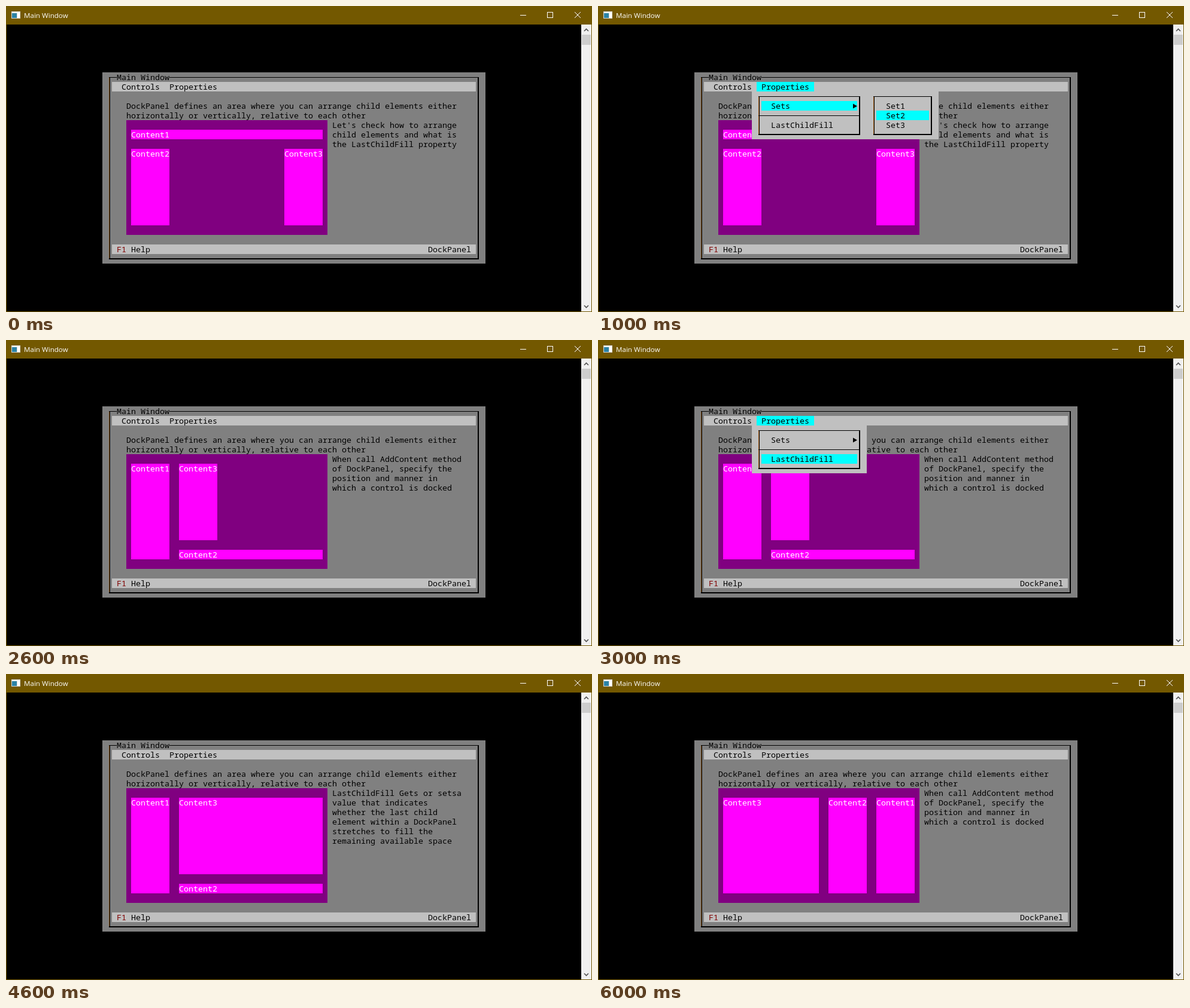
Recreate the animation shown at these times as an HTML page with a canvas. Size 979 by 512 pixels, loop 7000 ms.

```html
<!DOCTYPE html>
<html lang="en">
<head>
<meta charset="utf-8">
<title>Main Window</title>
<style>
html, body { margin: 0; width: 100%; height: 100%; overflow: hidden; background: #000; }
canvas { display: block; }
</style>
</head>
<body>
<canvas id="stage" width="979" height="512"></canvas>
<script>
const ctx = document.getElementById('stage').getContext('2d');

// The console is a grid of 8 x 16 cells starting just inside the window border.
const CELL_W = 8, CELL_H = 16, LEFT = 1, TOP = 31;
const GREY = '#808080', SILVER = '#c0c0c0', CYAN = '#00ffff', MAGENTA = '#ff00ff';
const STEP = 1000;

const INTRO = [
  'DockPanel defines an area where you can arrange child elements either',
  'horizontally or vertically, relative to each other'
];
const CHECK_NOTE = [
  "Let's check how to arrange",
  'child elements and what is',
  'the LastChildFill property'
];
const DOCK_NOTE = [
  'When call AddContent method',
  'of DockPanel, specify the',
  'position and manner in',
  'which a control is docked'
];
const FILL_NOTE = [
  'LastChildFill Gets or setsa',
  'value that indicates',
  'whether the last child',
  'element within a DockPanel',
  'stretches to fill the',
  'remaining available space'
];

// Each entry places Content1, Content2, Content3 as [column, row, width, height].
const set1 = { note: CHECK_NOTE, boxes: [[26, 11, 40, 1], [26, 13, 8, 8], [58, 13, 8, 8]] };
const set2 = { note: DOCK_NOTE, boxes: [[26, 11, 8, 10], [36, 20, 30, 1], [36, 11, 8, 8]] };
const set2Filled = { note: FILL_NOTE, boxes: [[26, 11, 8, 10], [36, 20, 30, 1], [36, 11, 30, 8]] };
const set3 = { note: DOCK_NOTE, boxes: [[58, 11, 8, 10], [48, 11, 8, 10], [26, 11, 20, 10]] };

const scenes = [
  { panel: set1 },
  { panel: set1, menu: { set: 2 } },
  { panel: set2 },
  { panel: set2, menu: {} },
  { panel: set2Filled },
  { panel: set2Filled, menu: { set: 3, checked: true } },
  { panel: set3 }
];

function rect(x, y, w, h, color) {
  ctx.fillStyle = color;
  ctx.fillRect(x, y, w, h);
}

function cells(col, row, w, h, color) {
  rect(LEFT + col * CELL_W, TOP + row * CELL_H, w * CELL_W, h * CELL_H, color);
}

function put(col, row, text, color = '#000') {
  ctx.font = '13.333px "Noto Sans Mono", "DejaVu Sans Mono", monospace';
  ctx.fillStyle = color;
  [...text].forEach((char, i) =>
    ctx.fillText(char, LEFT + (col + i) * CELL_W, TOP + row * CELL_H + 13));
}

function putLines(col, row, lines) {
  lines.forEach((line, i) => put(col, row + i, line));
}

function stroke(color, ...points) {
  ctx.strokeStyle = color;
  ctx.beginPath();
  points.forEach(([x, y]) => ctx.lineTo(x, y));
  ctx.stroke();
}

// Thin top and left edges, heavy right and bottom ones, through cell centres.
function frame(col, row, lastCol, lastRow, fringe) {
  const x = LEFT + col * CELL_W + 4, y = TOP + row * CELL_H + 8;
  const right = LEFT + lastCol * CELL_W + 4, bottom = TOP + lastRow * CELL_H + 8;
  rect(x - 1, y, right - x + 2, 1, '#000');
  rect(x - 1, y + 1, 1, bottom - y, fringe);
  rect(x, y, 1, bottom - y, '#000');
  rect(right - 1, y, 2, bottom - y + 1, '#000');
  rect(x - 1, bottom - 1, right - x + 2, 2, '#000');
}

function drawIcon() {
  rect(9, 9, 15, 12, '#d9d9d9');
  rect(10, 10, 13, 2, '#f4f4f4');
  rect(10, 12, 8, 8, '#2c83a6');
  rect(19, 12, 4, 8, '#ffffff');
}

function drawWindow() {
  rect(0, 0, 979, 512, '#735800');
  rect(1, 31, 977, 480, '#000');
  drawIcon();
  ctx.font = '11.6px "Open Sans", "Noto Sans", sans-serif';
  ctx.fillStyle = '#fff';
  ctx.fillText('Main Window', 30, 20);

  ctx.lineWidth = 1;
  rect(859, 15, 10, 1, '#fff');
  ctx.strokeStyle = '#fff';
  ctx.strokeRect(904.5, 10.5, 9, 9);
  stroke('#fff', [950, 10], [960, 20]);
  stroke('#fff', [960, 10], [950, 20]);

  rect(961, 31, 17, 480, '#f0f0f0');
  rect(962, 48, 15, 17, '#cdcdcd');
  ctx.lineWidth = 1.6;
  stroke('#505050', [966, 42], [969.5, 38.5], [973, 42]);
  stroke('#505050', [966, 501], [969.5, 504.5], [973, 501]);
}

function drawPanel({ note, boxes }) {
  cells(20, 5, 80, 20, GREY);
  frame(21, 5, 98, 24, '#784810');
  cells(23, 5, 11, 1, GREY);
  put(23, 5, 'Main Window');
  cells(22, 6, 76, 1, SILVER);
  put(24, 6, 'Controls');
  put(34, 6, 'Properties');
  cells(22, 23, 76, 1, SILVER);
  put(23, 23, 'F1', '#800000');
  put(26, 23, 'Help');
  put(88, 23, 'DockPanel');

  putLines(25, 8, INTRO);
  putLines(68, 10, note);
  cells(25, 10, 42, 12, '#800080');
  boxes.forEach(([col, row, w, h], i) => {
    cells(col, row, w, h, MAGENTA);
    put(col, row, 'Content' + (i + 1), '#fff');
  });
}

function drawMenu({ set, checked }) {
  const fringe = '#a86420';
  cells(33, 6, 12, 1, CYAN);
  put(34, 6, 'Properties');
  cells(32, 7, set ? 39 : 24, 5, SILVER);
  frame(33, 7, 54, 11, fringe);
  rect(268, 183, 170, 1, '#000');
  cells(34, set ? 8 : 10, 20, 1, CYAN);
  put(36, 8, 'Sets');
  put(36, 10, 'LastChildFill');
  if (checked) put(34, 10, '√');

  ctx.fillStyle = '#000';
  ctx.beginPath();
  ctx.moveTo(426, 163.5);
  ctx.lineTo(433, 167.5);
  ctx.lineTo(426, 171.5);
  ctx.fill();

  if (!set) return;
  frame(57, 7, 69, 11, fringe);
  cells(58, 7 + set, 11, 1, CYAN);
  putLines(60, 8, ['Set1', 'Set2', 'Set3']);
}

function render(now) {
  const { panel, menu } = scenes[Math.floor(now / STEP) % scenes.length];
  drawWindow();
  drawPanel(panel);
  if (menu) drawMenu(menu);
  requestAnimationFrame(tick);
}

let start;
function tick(now) {
  start ??= now;
  render(now - start);
}
requestAnimationFrame(tick);
</script>
</body>
</html>
```
